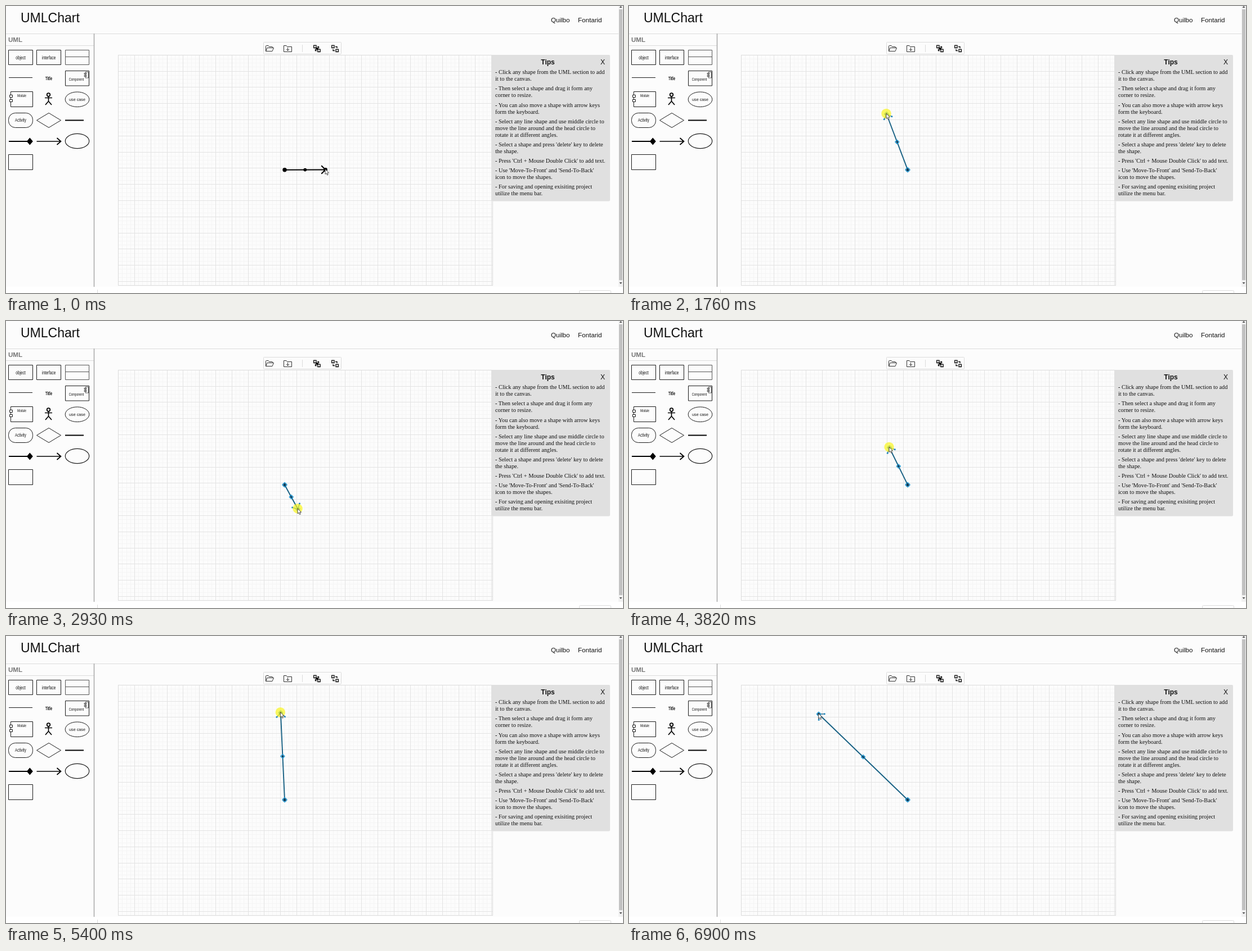
An HTML page with a canvas for the animation above (7.15 s loop, 1096 by 511 pixels).

```html
<!DOCTYPE html>
<html lang="en">
<head>
<meta charset="utf-8">
<title>UMLChart</title>
<style>
html, body { margin: 0; width: 100%; height: 100%; overflow: hidden; background: #fcfcfc; }
svg, canvas { position: absolute; left: 0; top: 0; width: 1096px; height: 511px; }
text { font-family: Arial, "Liberation Sans", sans-serif; fill: #111; }
.mid { text-anchor: middle; }
.bold { font-weight: bold; }
#tips text { font-family: "Times New Roman", "Liberation Serif", serif; font-size: 10.3px; white-space: pre; }
.icon { fill: none; stroke: #1c1c1c; stroke-width: 1; }
.thick { stroke-width: 2; stroke: #000; }
.rule { fill: none; stroke: #dcdcdc; }
</style>
</head>
<body>
<svg viewBox="0 0 1096 511">
  <rect y="500" width="1096" height="11" fill="#fff"/>
  <path class="rule" d="M0 49.5H1088M0 70.5H156M162.5 505V511M1018.5 511V508.5Q1018.5 506.5 1020.5 506.5H1072.5Q1074.5 506.5 1074.5 508.5V511"/>
  <path d="M156.5 49V500" stroke="#a8a8a8" stroke-width="1.5"/>

  <rect x="1088" width="8" height="500" fill="#f1f1f1"/>
  <rect x="1089" y="6" width="6" height="482" fill="#c1c1c1"/>
  <path d="M1089.5 3L1092 0L1094.5 3ZM1089.5 492L1092 495L1094.5 492Z" fill="#505050"/>

  <text x="26" y="29" font-size="23">UMLChart</text>
  <text x="968" y="29" font-size="11.6">Quilbo</text>
  <text x="1016" y="29" font-size="11.6">Fontarid</text>
  <text class="bold" x="4" y="63.5" font-size="11.6" style="fill:#777">UML</text>

  <path id="minor" fill="none" stroke="#f5f5f5"/>
  <path id="major" fill="none" stroke="#e3e3e3"/>
  <rect class="rule" x="199.5" y="87.5" width="665" height="410"/>

  <rect class="rule" x="457.5" y="64.5" width="138" height="21" rx="1"/>
  <path class="rule" d="M526.5 69V82"/>
  <g class="icon" style="stroke:#333">
    <path d="M461.5 80.5V71.5Q461.5 70.5 462.5 70.5H466L467.5 72.5H473Q473.5 72.5 473.5 74.5M461.5 80.5L464 74.5H475.5L473 80.5Z"/>
    <path d="M493.5 81.5V70.5H498L499.5 72.5H507.5V81.5ZM500.5 74V79M498 77L500.5 79.5L503 77"/>
  </g>
  <g class="icon" style="stroke:#000;stroke-width:1.3">
    <path d="M546.7 70.2H551V74.5H546.7ZM553.8 77.2H558.1V81.5H553.8Z"/>
    <path d="M553 72.5H555.5V75.5M549.5 76.5V79.5H552"/>
    <path d="M550.5 74H554.5V78H550.5Z" fill="#000" stroke="none"/>
    <path d="M578.7 70.2H583V74.5H578.7ZM586 77.2H590.3V81.5H586ZM585 72.5H588V75M581 77V79.5H584"/>
  </g>

  <g class="icon">
    <path d="M4.5 78.5H47.5V104.5H4.5ZM54.5 78.5H97.5V104.5H54.5Z"/>
    <path d="M105.5 78.5H147.5V104.5H105.5ZM105.5 90.5H147.5" stroke="#555"/>
    <path d="M5 127.5H47"/>
    <path d="M105.5 115.5H147.5V142H105.5Z"/>
    <path d="M141 117.5H146.5V128H141ZM139 119.5H143V121.5H139ZM139 123.5H143V125.5H139Z" fill="#fcfcfc" stroke-width=".7"/>
    <path d="M8.5 152.5H47.5V179.5H8.5Z"/>
    <path d="M6.5 158.5H11.5V162.5H6.5ZM6.5 166.5H11.5V170.5H6.5Z" fill="#fcfcfc"/>
    <g stroke="#000" stroke-width="1.7">
      <circle cx="75.5" cy="158" r="2.8"/>
      <path d="M75.5 161V169.5M69 163.5H82M70 176L75.5 169.5L81 176"/>
    </g>
    <ellipse cx="126.5" cy="166.3" rx="21.3" ry="13.3"/>
    <rect x="4.5" y="190.5" width="43" height="26" rx="12"/>
    <path d="M54.5 203.5L76 190.5L97.5 203.5L76 216.5Z"/>
    <path class="thick" d="M105 203.5H138M5 241H40"/>
    <path d="M36.8 241L42.3 234.5L47.8 241L42.3 247.5Z" fill="#000" stroke="none"/>
    <path class="thick" d="M54.5 241H97M90.5 235L97.5 241L90.5 247" style="stroke-width:1.7"/>
    <ellipse cx="126.5" cy="240.5" rx="21.2" ry="13.2" stroke-width="1.2"/>
    <path d="M4.5 264.5H47.5V291.5H4.5Z"/>
  </g>
  <g id="labels"></g>

  <rect x="862.5" y="87" width="210.5" height="260.5" rx="2" fill="#e0e0e0"/>
  <text class="mid bold" x="962.5" y="104" font-size="12">Tips</text>
  <text class="mid" x="1060" y="104" font-size="12">X</text>
  <g id="tips"></g>
</svg>
<canvas id="stage" width="1096" height="511"></canvas>

<script>
const $ = id => document.getElementById(id);

function addText(parent, str, attrs) {
  const el = document.createElementNS("http://www.w3.org/2000/svg", "text");
  for (const k in attrs) el.setAttribute(k, attrs[k]);
  el.textContent = str;
  parent.appendChild(el);
  return el;
}

function buildGrid() {
  const step = 7.2;
  const paths = { minor: "", major: "" };
  const snap = v => Math.floor(v) + 0.5;
  for (let i = 0; i * step < 665; i++) {
    const key = i % 4 ? "minor" : "major";
    paths[key] += `M${snap(199.6 + i * step)} 87V498`;
    if (i * step < 411) paths[key] += `M199 ${snap(87.2 + i * step)}H865`;
  }
  for (const key in paths) $(key).setAttribute("d", paths[key]);
}

function buildLabels() {
  // The palette icons are squeezed horizontally, lettering included.
  const squeeze = 0.7;
  const label = (str, x, y, size, sx = squeeze, cls = "mid") =>
    addText($("labels"), str, { class: cls, "font-size": size, transform: `translate(${x} ${y}) scale(${sx} 1)` });
  label("object", 26, 94.5, 9.4);
  label("interface", 76, 94.5, 9.1);
  label("Title", 76, 132.3, 8.6, squeeze, "mid bold");
  label("Component", 125, 133, 7.3);
  label("Module", 28, 162, 7);
  label("use case", 126.5, 169, 7.2, 1);
  label("Activity", 26, 206.3, 9);
}

function buildTips() {
  const tips = [
    [121, "Click any shape from the UML section to add", "it to the canvas."],
    [150, "Then select a shape and drag it form any", "corner to resize."],
    [179.5, "You can also move a shape with arrow keys", "form the keyboard."],
    [208.5, "Select any line shape and use middle circle to", "move the line around and the head circle to", "rotate it at different angles."],
    [249.5, "Select a shape and press 'delete' key to delete", "the shape."],
    [279, "Press 'Ctrl + Mouse Double Click' to add text."],
    [296.3, "Use 'Move-To-Front' and 'Send-To-Back'", "icon to move the shapes."],
    [325, "For saving and opening exisiting project", "utilize the menu bar."]
  ];
  for (const [y, ...lines] of tips) lines.forEach((line, i) => {
    const el = addText($("tips"), i ? line : " " + line, { x: 869, y: y + i * 12.1 });
    if (!i) {
      const dash = document.createElementNS(el.namespaceURI, "tspan");
      dash.setAttribute("class", "bold");
      dash.textContent = "-";
      el.prepend(dash);
    }
  });
}

const LOOP = 7150, SELECT = 470, RELEASE = 6900;
const BASE = [495, 291.7];
// start, end and number of pointer updates in each drag
const drags = [[720, 4330, 57], [4580, 5510, 15], [5760, 6400, 11]];
// time, x, y
const path = [
  [0, 567, 290.5], [650, 567, 290.5], [900, 553, 250], [1120, 522, 211], [1430, 474, 196],
  [1751, 457, 191.5], [1950, 464, 177.5], [2210, 494, 181], [2420, 539, 207], [2600, 559.5, 255],
  [2780, 547, 308], [2912, 518, 334], [2980, 507, 338], [3200, 465, 331], [3450, 430.5, 295],
  [3750, 450, 244], [3814, 462, 224.5], [4050, 500, 203], [4330, 543, 199], [4510, 543, 199],
  [4690, 579, 170], [4779, 576, 147], [4990, 552, 125], [5270, 513, 131], [5510, 465, 140],
  [5700, 465, 140], [6016, 367.5, 146], [6400, 336.5, 138], [LOOP, 336.5, 138]
];

function slope(i, k) {
  const a = path[i - 1], b = path[i], c = path[i + 1];
  const still = (p, q) => p[1] === q[1] && p[2] === q[2];
  if (!a || !c || still(a, b) || still(b, c)) return 0;
  return (c[k] - a[k]) / (c[0] - a[0]);
}

function pointer(t) {
  let i = 0;
  while (i < path.length - 2 && t >= path[i + 1][0]) i++;
  const a = path[i], b = path[i + 1], d = b[0] - a[0], u = (t - a[0]) / d;
  const u2 = u * u, u3 = u2 * u;
  return [1, 2].map(k =>
    (2 * u3 - 3 * u2 + 1) * a[k] + (u3 - 2 * u2 + u) * d * slope(i, k) +
    (3 * u2 - 2 * u3) * b[k] + (u3 - u2) * d * slope(i + 1, k));
}

function stepTime(t) {
  let out = 0;
  for (const [start, end, n] of drags) {
    if (t < start) break;
    const gap = (end - start) / (n - 1);
    out = start + Math.min(n - 1, Math.floor((t - start) / gap + 0.2)) * gap;
  }
  return out;
}

const ctx = $("stage").getContext("2d");

function line(points, color, width) {
  ctx.beginPath();
  points.forEach(([x, y]) => ctx.lineTo(x, y));
  ctx.strokeStyle = color;
  ctx.lineWidth = width;
  ctx.stroke();
}

function disc([x, y], r, fill) {
  ctx.beginPath();
  ctx.arc(x, y, r, 0, Math.PI * 2);
  ctx.fillStyle = fill;
  ctx.fill();
}

function handle([x, y], r) {
  const blue = "#1795d4", s = r + 1;
  disc([x, y], r, "#0b3d5c");
  ctx.beginPath();
  ctx.arc(x, y, s, 0, Math.PI * 2);
  ctx.strokeStyle = blue;
  ctx.lineWidth = 1;
  ctx.stroke();
  for (const [dx, dy] of [[s, 0], [-s, 0], [0, s], [0, -s]]) disc([x + dx, y + dy], 1.1, blue);
}

function drawCursor([x, y]) {
  const shape = [[0, 0], [0, 9], [2, 7.2], [3.6, 10.6], [5.2, 9.8], [3.7, 6.6], [6.5, 6.4]];
  ctx.beginPath();
  shape.forEach(([dx, dy]) => ctx.lineTo(x + dx, y + dy));
  ctx.closePath();
  ctx.fillStyle = "#fff";
  ctx.fill();
  ctx.strokeStyle = "#222";
  ctx.lineWidth = 0.8;
  ctx.stroke();
}

function draw(t) {
  const selected = t >= SELECT;
  const mouse = pointer(stepTime(t));
  const tip = [mouse[0] + 0.5, mouse[1] + 1];
  const mid = [(BASE[0] + tip[0]) / 2, (BASE[1] + tip[1]) / 2];
  const back = Math.atan2(BASE[1] - tip[1], BASE[0] - tip[0]);
  const arms = [-1, 1].map(s => {
    const a = back + s * Math.PI / 4;
    return [tip[0] + 10.3 * Math.cos(a), tip[1] + 10.3 * Math.sin(a)];
  });

  ctx.clearRect(0, 0, 1096, 511);
  if (selected) {
    line([BASE, tip], "#176083", 1.9);
    line([arms[0], tip, arms[1]], "#176083", 1.3);
    arms.forEach(p => disc(p, 1.5, "#1f86bd"));
    handle(BASE, 2.6);
    handle(mid, 2);
    handle(tip, 2.2);
  } else {
    line([BASE, tip], "#000", 2);
    line([arms[0], tip, arms[1]], "#000", 2);
    disc(BASE, 3.7, "#000");
    disc(mid, 2.9, "#000");
    disc(tip, 3.4, "#000");
  }
  if (selected && t < RELEASE) disc(mouse, 8.7, "rgba(250,245,30,.7)");
  drawCursor(mouse);
}

buildGrid();
buildLabels();
buildTips();
const began = performance.now();
function tick() {
  draw((performance.now() - began) % LOOP);
  requestAnimationFrame(tick);
}
tick();
</script>
</body>
</html>
```
